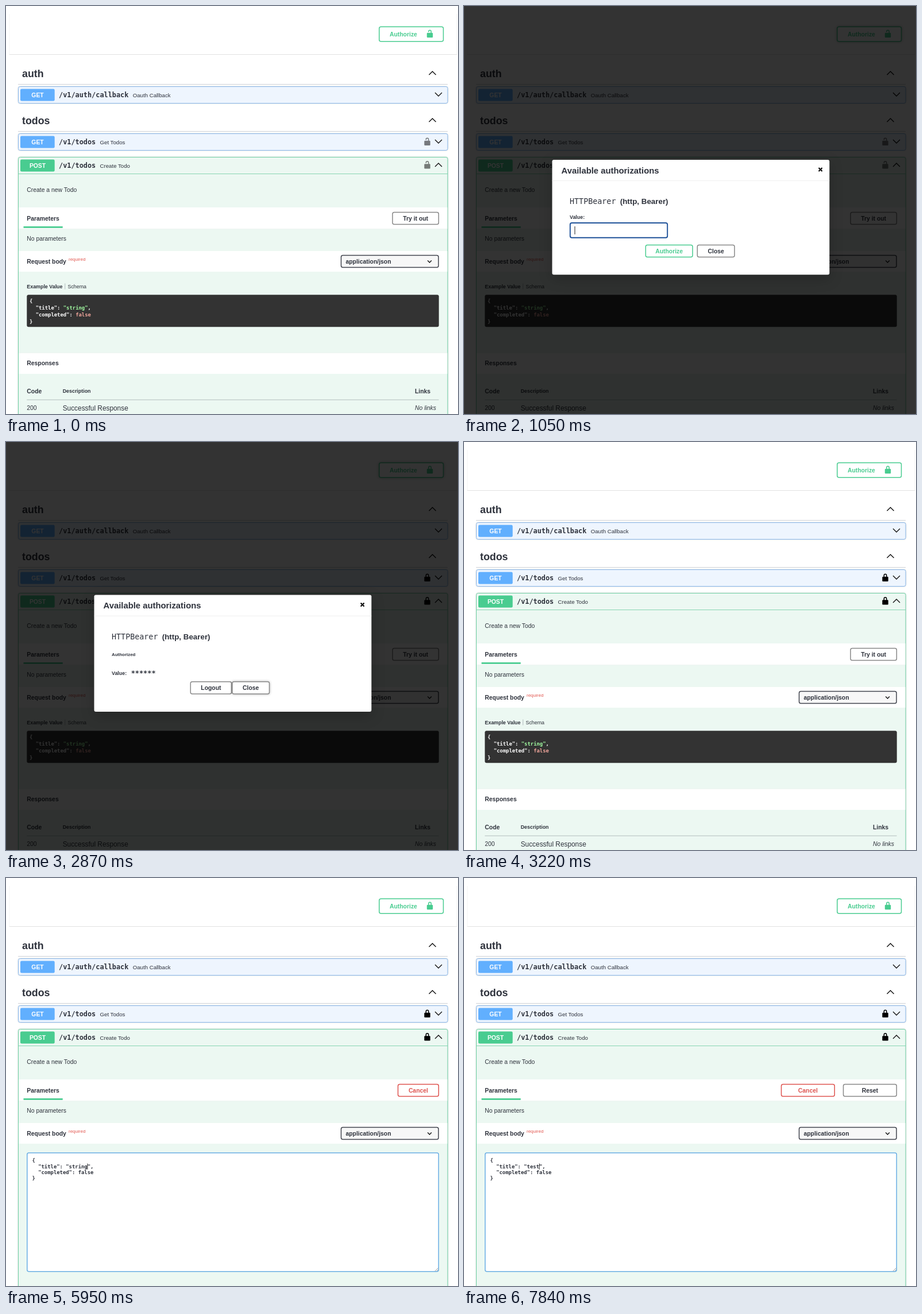
An HTML page for the animation above (8000 ms loop, 787 px wide and 711 px high).

```html
<!DOCTYPE html>
<html lang="en">
<head>
<meta charset="utf-8">
<title>API docs</title>
<style>
  html, body { margin: 0; height: 100%; overflow: hidden; background: #fff; }
  svg { display: block; width: 100vw; height: 100vh; }
  text { font-family: "Liberation Sans", Arial, sans-serif; fill: #2e323c; dominant-baseline: central; white-space: pre; }
  .b { font-weight: bold; }
  .m { font-family: "DejaVu Sans Mono", monospace; }
  .mid { text-anchor: middle; }
  .end { text-anchor: end; }
  .block { filter: drop-shadow(0 0 1px rgba(0,0,0,.19)); }
  .bar { filter: drop-shadow(0 .7px .7px rgba(0,0,0,.13)); }
  .modal { filter: drop-shadow(0 7px 11px rgba(0,0,0,.2)); }
</style>
</head>
<body>
<svg id="stage" viewBox="0 0 787 711"></svg>
<script>
const LOOP = 8000;
const GREEN = '#49cc90', BLUE = '#61affe', INK = [46, 50, 60], GREY = [136, 136, 136], RED = [222, 84, 80];
const CHAR = 5.355;

// Times of the user's actions, in ms
const HOVER_OPEN = 770, OPEN = 1050, CARET_OFF = 1540, PASTE = 1680, HOVER_AUTH = 2100, AUTHORIZE = 2520,
  CLOSE = 3220, HOVER_TRY = 4200, TRY = 4480, LEAVE = 4600, FOCUS = 5950, DRAG = 6090, SELECT = 6580, TYPE = 7210;

// Every button transition lasts 300 ms
const ramp = (t, start) => Math.min(1, Math.max(0, (t - start) / 300));
const rgb = c => `rgb(${c.map(Math.round)})`;
const mix = (a, b, p) => rgb(a.map((v, i) => v + (b[i] - v) * p));

const text = (x, y, size, str, cls = '', attrs = '') =>
  `<text x="${x}" y="${y}" font-size="${size}" class="${cls}" ${attrs}>${str}</text>`;
const rect = (x0, y0, x1, y1, fill, attrs = '') =>
  `<rect x="${x0}" y="${y0}" width="${x1 - x0}" height="${y1 - y0}" fill="${fill}" ${attrs}/>`;
const outline = (color, width = 1.5) => `rx="3" stroke="${color}" stroke-width="${width}"`;
const glow = p => p ? ` style="filter:drop-shadow(0 0 2px rgba(0,0,0,${.3 * p}))"` : '';
const line = (x0, x1, y, color) => rect(x0, y, x1, y + .8, color);

const chevron = (x, y, dir, w = 6, h = 3) =>
  `<path d="M${x - w} ${y - h * dir}L${x} ${y + h * dir}L${x + w} ${y - h * dir}" fill="none" stroke="#111" stroke-width="1.4"/>`;

const lock = (x, y, closed, color) =>
  `<g transform="translate(${x - 7.42} ${y - 7.42}) scale(.742)" opacity="${color || closed ? 1 : .5}">
    <rect x="3" y="8" width="14" height="11" rx="1.6" fill="${color || '#000'}"/>
    <path d="M7 ${closed ? 9 : 6}V5.4C7 3 8 2 10 2S13 3 13 5.4V9" fill="none" stroke="${color || '#000'}" stroke-width="2"/></g>`;

const button = (x0, x1, y, label, { border = rgb(GREY), color = rgb(INK), hover = 0 } = {}) =>
  rect(x0, y - 10.6, x1, y + 10.6, '#fff', outline(border) + glow(hover)) +
  text((x0 + x1) / 2, y, 10.39, label, 'b mid', `style="fill:${color}"`);

const tag = (y, name) =>
  text(28, y, 17.8, name, 'b') + chevron(742.5, y - .5, -1) + line(21, 769, y + 18.5, 'rgba(59,65,81,.3)');

function operation(y, bottom, method, color, border, fill, path, summary) {
  return rect(21.5, y - 14.5, 769, bottom, fill, outline(border, 1) + ' class="block"') +
    rect(25, y - 10.5, 84.7, y + 10.5, color, 'rx="2.2"') +
    text(55, y, 10.39, method, 'b mid', 'style="fill:#fff"') +
    text(92, y, 11.87, path, 'b m') +
    text(92 + path.length * 7.146 + 7.3, y, 9.65, summary);
}

const getOperation = (y, path, summary) =>
  operation(y, y + 14.5, 'GET', BLUE, '#8ab8ea', '#eef5fe', path, summary) + chevron(753, y - .9, 1);

const band = (y0, y1) => rect(22, y0, 768.5, y1, '#fff', 'class="bar"');

function page(t) {
  const locked = t >= AUTHORIZE;
  return rect(0, 0, 787, 711, '#fff') +
    rect(5.5, 14, 6.3, 84, '#f1f1f1') + rect(784.5, 14, 785.3, 84, '#f1f1f1') + rect(5.5, 84, 785.3, 85, '#e2e2e2') +
    rect(649.8, 36.2, 761.5, 61.8, '#fff', outline(GREEN) + glow(t < CLOSE ? ramp(t, HOVER_OPEN) : 0)) +
    text(668, 49, 10.39, 'Authorize', 'b', `style="fill:${GREEN}"`) + lock(738, 48.3, locked, GREEN) +
    tag(117.5, 'auth') +
    getOperation(155, '/v1/auth/callback', 'Oauth Callback') +
    tag(199.5, 'todos') +
    getOperation(237, '/v1/todos', 'Get Todos') + lock(733.5, 236.2, locked) +
    operation(278, 730, 'POST', GREEN, '#6fcfa3', '#ecf8f2', '/v1/todos', 'Create Todo') +
    lock(733.5, 276.8, locked) + chevron(753, 277, -1) +
    line(21.5, 769, 292.2, '#6fcfa3') +
    text(36.3, 320.5, 10.39, 'Create a new Todo') +
    band(351, 388.5) + text(36.3, 370, 10.39, 'Parameters', 'b') + rect(30.5, 384, 98.7, 386.8, GREEN) +
    text(36.3, 405.5, 10.39, 'No parameters') +
    band(427, 463) + text(36.3, 445, 10.39, 'Request body', 'b') +
    text(109, 441.5, 8, 'required', '', 'style="fill:#e2564f"') +
    rect(583.5, 434.5, 753, 455.5, '#f7f7f7', outline('#41444e')) +
    text(591.5, 445, 10.39, 'application/json', 'b') + chevron(737.5, 445.3, 1, 3.4, 1.7) +
    (t < TRY ? example(t) : editor(t));
}

function example(t) {
  const code = (y, str) => text(41, y, 8.9, str, 'b m', 'style="fill:#fff"');
  return button(673, 753.3, 370, 'Try it out', { hover: ramp(t, HOVER_TRY) }) +
    text(36.3, 488.5, 8.9, 'Example Value', 'b') + rect(102.4, 483.5, 103.2, 493.5, 'rgba(59,65,81,.4)') +
    text(107.5, 488.5, 8.9, 'Schema') +
    rect(36.3, 503.3, 753.7, 559.3, '#333', 'rx="3"') +
    code(514, '{') +
    code(526, '  "title": <tspan style="fill:#a2fca2">"string"</tspan>,') +
    code(538, '  "completed": <tspan style="fill:#f0a59b">false</tspan>') +
    code(550, '}') +
    band(604.5, 641) + text(36.3, 622.7, 10.39, 'Responses', 'b') +
    text(36.3, 671, 10.39, 'Code', 'b') + text(98.7, 671, 8.9, 'Description', 'b') + text(712, 671, 10.39, 'Links', 'b') +
    line(36.3, 753.5, 685.8, 'rgba(59,65,81,.4)') +
    text(36.3, 700, 10.39, '200') + text(98.7, 701, 11.87, 'Successful Response') +
    text(712, 700, 10.39, 'No links', '', 'font-style="italic"');
}

function editor(t) {
  const focused = t >= FOCUS, edited = t >= TYPE;
  const value = edited ? 'test'.slice(0, 1 + Math.floor((t - TYPE) / 210)) : 'string';
  const selected = edited || t < DRAG ? 0 : t < SELECT ? 2 : 6;
  const x = focused ? 45.5 : 44, y = focused ? 492.4 : 490.9;
  const prefix = '  "title": "';
  const end = x + (prefix.length + value.length) * CHAR;
  const lines = ['{', `${prefix}${value}",`, '  "completed": false', '}'];
  const cancel = {
    border: mix(GREY, RED, ramp(t, TRY - 100)),
    color: mix(INK, RED, ramp(t, TRY)),
    hover: 1 - ramp(t, LEAVE)
  };
  return (edited
      ? button(552.5, 645.2, 370, 'Cancel', cancel) + button(660.5, 753.2, 370, 'Reset')
      : button(682.5, 753.3, 370, 'Cancel', cancel)) +
    rect(36.8, 479, 753.2, 685.8, '#fff', focused ? outline('#6aaee4') : 'rx="3"') +
    rect(end - selected * CHAR, 497.5, end, 508.5, '#b4d7ff') +
    lines.map((s, i) => text(x, y + i * 10.3, 8.9, s, 'b m')).join('') +
    (focused && !selected ? rect(end - .4, 497.5, end + .5, 508, '#222') : '') +
    '<path d="M747 685L752.5 679.5M750 685L752.5 682.5" stroke="#888" stroke-width=".8"/>';
}

function modal(t) {
  const done = t >= AUTHORIZE;
  const dy = done ? -1.5 : 0;
  return rect(0, 0, 787, 711, 'rgba(0,0,0,.8)') +
    rect(153.5, 268 + dy, 636.3, done ? 470 : 468.3, '#fff', 'rx="3" class="modal"') +
    text(169.5, 286.5 + dy, 14.84, 'Available authorizations', 'b') +
    `<path d="M617.6 ${282 + dy}l6 6m0 -6l-6 6" stroke="#000" stroke-width="2"/>` +
    line(153.5, 636.3, 304.2 + dy, '#ebebeb') +
    text(184, 340.5 + dy, 13.36, 'HTTPBearer', 'm') + text(271.7, 340.5 + dy, 13.36, '(http, Bearer)', 'b') +
    (done ? authorized(t) : tokenForm(t));
}

function tokenForm(t) {
  const pasted = t >= PASTE;
  const caretOn = pasted ? (t - PASTE) % 1000 < 500 : t < CARET_OFF;
  const caretX = pasted ? 346.5 : 192.5;
  return text(184, 368, 8.9, 'Value:', 'b') +
    rect(184.8, 378, 354.2, 403.7, '#fff', outline('#1f5299', 1.9)) +
    (pasted
      ? '<clipPath id="field"><rect x="192" y="380" width="155" height="22"/></clipPath><g clip-path="url(#field)">' +
        text(346, 391, 10.39, 'eyJhbGciOiJIUzI1NiIsInR5cCI6IkpXVCJ9.k3Vd8sQ2mXw7', 'end') + '</g>'
      : '') +
    (caretOn ? rect(caretX, 384, caretX + 1, 398, '#222') : '') +
    button(316.3, 398, 427, 'Authorize', { border: GREEN, color: GREEN, hover: ramp(t, HOVER_AUTH) }) +
    button(406.3, 471, 427, 'Close');
}

const authorized = t =>
  text(184, 370.5, 7.95, 'Authorized', 'b') +
  text(184, 402.7, 8.9, 'Value:', 'b') + text(217.7, 402.5, 11.87, '******', 'b m') +
  button(321.3, 392.6, 428.3, 'Logout') +
  button(394, 458.5, 428.3, 'Close', { hover: ramp(t, AUTHORIZE) });

const stage = document.getElementById('stage');
let shown = '';
function draw() {
  const t = performance.now() % LOOP;
  const scene = page(t) + (t >= OPEN && t < CLOSE ? modal(t) : '');
  if (scene !== shown) stage.innerHTML = shown = scene;
  requestAnimationFrame(draw);
}
draw();
</script>
</body>
</html>
```
